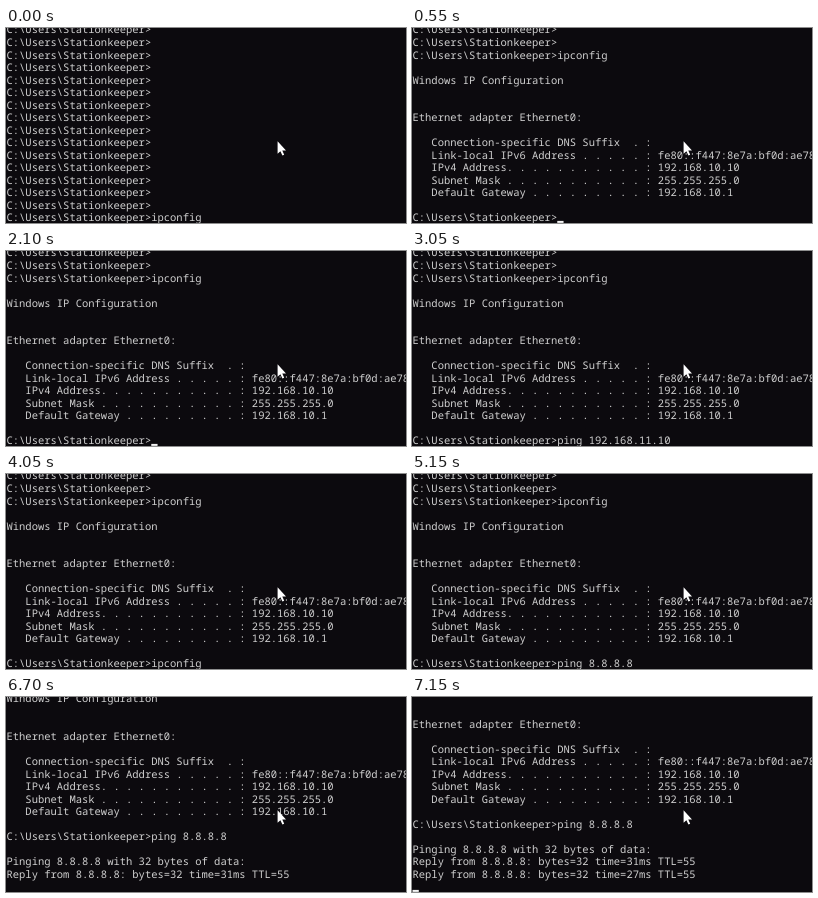
Recreate the animation shown at these times as an HTML page. Size 400 px wide and 195 px high, loop 8000 ms.

```html
<!DOCTYPE html>
<html lang="en">
<head>
<meta charset="utf-8">
<title>Console session</title>
<style>
  html, body { margin: 0; width: 100%; height: 100%; overflow: hidden; background: #0c0a0e; }
  svg { display: block; width: 400px; height: 195px; }
  text {
    font: 10.49px "Noto Sans Mono", "DejaVu Sans Mono", monospace;
    white-space: pre;
    text-rendering: geometricPrecision;
    fill: #d0d0d0;
  }
</style>
</head>
<body>
<svg viewBox="0 0 400 195">
  <g id="screen"></g>
  <rect id="caret" y="192.9" width="6.3" height="2" fill="#f4f4f4"/>
  <path d="M271.6 113.2v12.6l2.8-2.6 2 4.3 1.8-.8-1.9-4.2h3.7z" fill="#fff"/>
</svg>
<script>
const LOOP = 8000, ROWS = 16, PITCH = 12.53, CELL = 6.294, LEFT = 0.5, BASE = 193.4;
const prompt = "C:\\Users\\Stationkeeper>";

const field = (label, value) => "   " + label + " : " + value;
const header = ["", "Windows IP Configuration", "", ""];
const details = [
  "Ethernet adapter Ethernet0:",
  "",
  field("Connection-specific DNS Suffix  .", ""),
  field("Link-local IPv6 Address . . . . .", "fe80::f447:8e7a:bf0d:ae78"),
  field("IPv4 Address. . . . . . . . . . .", "192.168.10.10"),
  field("Subnet Mask . . . . . . . . . . .", "255.255.255.0"),
  field("Default Gateway . . . . . . . . .", "192.168.10.1"),
  ""
];
const reply = ms => `Reply from 8.8.8.8: bytes=32 time=${ms}ms TTL=55`;

const start = [...Array(ROWS - 1).fill(prompt), prompt + "ipconfig"];
const listed = [...start, ...header, ...details];
const typed = command => [...listed, prompt + command];
const pinged = [...typed("ping 8.8.8.8"), "", "Pinging 8.8.8.8 with 32 bytes of data:", reply(31)];

// [start time, buffer]; the last line holds the caret
const steps = [
  [0, start],
  [300, [...start, ...header]],
  [350, typed("")],
  [2350, typed("ping 192.168.11.10")],
  [3650, typed("ipconfig")],
  [4500, typed("ping 192.168.10.1")],
  [4950, typed("ping 8.8.8.8")],
  [5750, [...pinged, ""]],
  [6900, [...pinged, reply(27), ""]]
];

// times at which the caret turns on and off
const caretOn = [[300, 1300], [2100, 2950], [3650, 4050], [4500, 5150], [5750, 6300], [7150, LOOP]];

const screen = document.getElementById("screen");
const caret = document.getElementById("caret");
const rows = Array.from({ length: ROWS }, (_, i) => {
  const row = document.createElementNS("http://www.w3.org/2000/svg", "text");
  row.setAttribute("x", LEFT);
  row.setAttribute("y", BASE - (ROWS - 1 - i) * PITCH);
  return screen.appendChild(row);
});

let shown = null;
function show(lines) {
  if (lines === shown) return;
  shown = lines;
  const view = lines.slice(-ROWS);
  rows.forEach((row, i) => { row.textContent = view[i]; });
  caret.setAttribute("x", LEFT + view[ROWS - 1].length * CELL);
}

function draw() {
  const t = performance.now() % LOOP;
  show(steps.filter(([from]) => from <= t).pop()[1]);
  const lit = caretOn.some(([from, to]) => t >= from && t < to);
  caret.setAttribute("visibility", lit ? "visible" : "hidden");
  requestAnimationFrame(draw);
}
draw();
</script>
</body>
</html>
```
